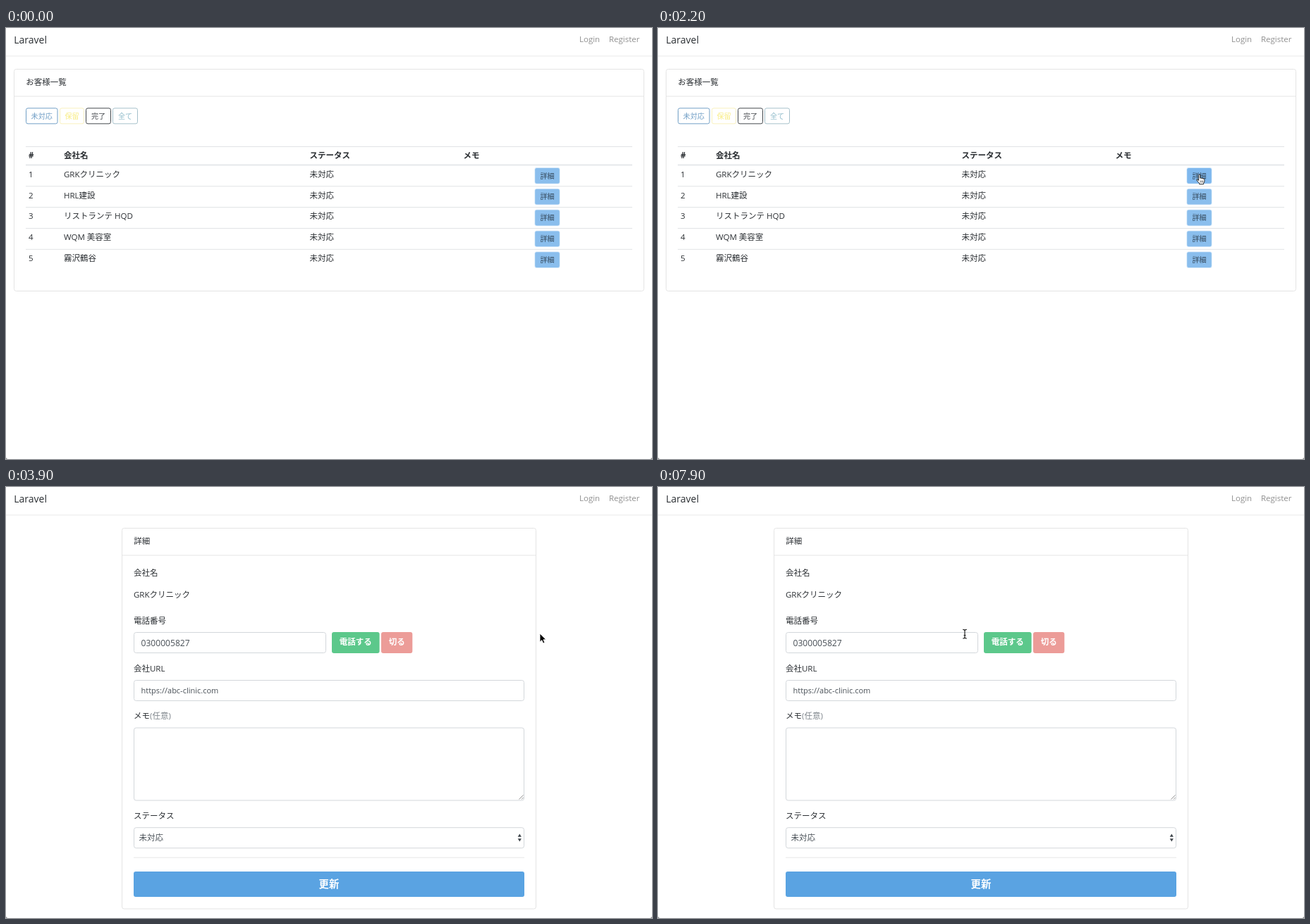
These frames come from a looping animation (916x612 px, 8 s). An HTML page:

```html
<!DOCTYPE html>
<html lang="ja">
<head>
<meta charset="utf-8">
<title>お客様一覧</title>
<style>
html, body { margin: 0; width: 100%; height: 100%; overflow: hidden; background: #fff; }
svg { display: block; }
text { font: 11.5px 'Open Sans', 'Noto Sans CJK JP', 'Noto Sans CJK', sans-serif; white-space: pre; }
</style>
</head>
<body>
<svg id="stage" width="916" height="612" viewBox="0 0 916 612" xmlns="http://www.w3.org/2000/svg">
  <defs>
    <filter id="blur" x="-5%" y="-50%" width="110%" height="200%"><feGaussianBlur stdDeviation="1.6"/></filter>
  </defs>
  <rect width="916" height="612" fill="#fff"/>
  <rect x="-10" y="1.6" width="936" height="38" fill="#000" opacity=".1" filter="url(#blur)"/>
  <rect width="916" height="39" fill="#fff"/>
  <g id="nav"></g>
  <g id="list"></g>
  <g id="detail"></g>
  <path d="M0 609Q0 612 3 612H0ZM916 609Q916 612 913 612H916Z" fill="#777"/>
  <g id="arrow"><path d="M0 0V12.2L2.8 9.6L4.7 14L6.9 13.1L5 8.8H8.8Z" fill="#000" stroke="#fff" stroke-width=".9" stroke-linejoin="round"/></g>
  <g id="hand"><path d="M-.9 8.6V1.2Q-.9 0 .2 0T1.3 1.2V5.2Q2.4 4.3 3.4 5.5Q4.6 4.7 5.4 5.9Q7.4 5.4 7.4 7.4V9.5Q7.2 11.2 6.1 12.3V13.8H.1V12.4Q-2 10.6-3.6 7.9Q-3.9 6.4-2.4 6.8Z" fill="#fff" stroke="#222" stroke-width="1" stroke-linejoin="round"/><path d="M1.6 8.6V11.6M3.4 8.6V11.6M5.1 8.6V11.6" stroke="#333" stroke-width=".7"/></g>
  <g id="beam" fill="none"><path id="bar" d="M-2.8-6.3Q-.2-6.3 0-4.9Q.2-6.3 2.8-6.3M0-5V5M-2.8 6.3Q-.2 6.3 0 4.9Q.2 6.3 2.8 6.3M-1.4 2H1.4" stroke="#222" stroke-width="1.2"/></g>
</svg>
<script>
const $ = id => document.getElementById(id);
const INK = '#2b2f33', FIELD = '#495057', LINE = '#e1e3e5';

const text = (x, y, s, o = {}) =>
  `<text x="${x}" y="${y}" fill="${o.fill || INK}" text-anchor="${o.anchor || 'start'}" ` +
  `style="font-size:${o.size || 11.5}px;font-weight:${o.weight || 400}">${s}</text>`;
const box = (x, y, w, h, fill, stroke = 'none', r = 3, id = '') =>
  `<rect ${id && `id="${id}"`} x="${x}" y="${y}" width="${w}" height="${h}" rx="${r}" fill="${fill}" stroke="${stroke}"/>`;
const rule = (x1, x2, y, w = 1, c = LINE) =>
  `<path d="M${x1} ${y}H${x2}" stroke="${c}" stroke-width="${w}"/>`;
const card = (x, w, h, title) =>
  box(x, 58.5, w, h, '#fff', '#e4e4e4') + rule(x, x + w, 97, 1, '#e4e4e4') + text(x + 16.7, 81.2, title);

$('nav').innerHTML =
  text(11.3, 21.8, 'Laravel', { size: 14 }) +
  text(813, 20.3, 'Login', { fill: '#8f8f8f' }) +
  text(855, 20.3, 'Register', { fill: '#8f8f8f' });

function listPage() {
  const filters = [
    [28.5, 44.5, '未対応', '#719fc6'], [76.5, 34, '保留', '#f8ec80', '#f9f1bd'],
    [113.5, 35, '完了', '#43474c'], [151.5, 35, '全て', '#90bccb', '#a5c0ca']];
  const heads = [[32, '#'], [82, '会社名'], [430.5, 'ステータス'], [648.5, 'メモ']];
  const names = ['GRKクリニック', 'HRL建設', 'リストランテ HQD', 'WQM 美容室', '霧沢鶴谷'];
  let s = card(11.5, 893, 315, 'お客様一覧');
  for (const [x, w, label, ink, edge] of filters)
    s += box(x, 113.9, w, 22, '#fff', edge || ink, 2.5) +
      text(x + w / 2, 128.5, label, { fill: ink, size: 10.1, anchor: 'middle' });
  s += rule(28, 888, 168.5) + rule(28, 888, 194.6, 1.5, '#dfe2e5');
  for (const [x, label] of heads) s += text(x, 185.2, label, { weight: 700 });
  names.forEach((name, i) => {
    const y = 211.7 + i * 29.85;
    if (i) s += rule(28, 888, 194.9 + i * 29.85);
    s += text(32, y, i + 1) + text(82, y, name) + text(430.5, y, '未対応');
    s += box(749.5, y - 13.6, 36, 23.4, '#d3e8fa', 'none', 3, 'ring' + i) +
      box(750.2, y - 12.8, 34.6, 21.8, '#8abeed', 'none', 2.3, 'btn' + i) +
      `<g id="label${i}">${text(767.5, y + 1.8, '詳細', { size: 10.1, anchor: 'middle', fill: '#34485b' })}</g>`;
  });
  return s;
}

function detailPage() {
  const field = (y, w, h) => box(181.5, y, w, h, '#fff', '#d3d7db');
  const white = { fill: '#fff', weight: 700, anchor: 'middle' };
  return card(164.5, 587, 540.5, '詳細') +
    text(181, 126.2, '会社名') + text(181, 157, 'GRKクリニック') +
    text(181, 193.7, '電話番号') + field(206.5, 272, 29) +
    text(191.5, 225.7, '0300005827', { fill: FIELD, size: 12.1 }) +
    box(462, 206, 67.6, 30, '#5cc88b', 'none', 3, 'call') + text(495.7, 224.4, '電話する', white) +
    box(532, 206, 44.3, 30, '#ec9c98') + text(554.2, 224.4, '切る', white) +
    text(181, 261.6, '会社URL') + field(274.5, 553, 29) +
    text(191.5, 292.5, 'https://abc-clinic.com', { fill: FIELD, size: 11 }) +
    text(181, 329.1, 'メモ<tspan fill="#7f868c">(任意)</tspan>') + field(342, 553, 103) +
    '<path d="M727.5 443.5L733.5 437.5M731 443.5L733.5 441" stroke="#777" stroke-width=".8"/>' +
    text(181, 470.8, 'ステータス') + field(483.7, 553, 29) +
    text(188.5, 501.8, '未対応', { fill: FIELD }) +
    '<path d="M725.7 496.8L728.3 492.6L730.9 496.8ZM725.7 499.2L728.3 503.4L730.9 499.2Z" fill="#40464c"/>' +
    rule(181, 735, 526.2, 1, '#e6e6e6') +
    box(181, 546, 554, 36, '#5aa3e2') +
    text(458, 568.7, '更新', { ...white, size: 14.4 });
}

$('list').innerHTML = listPage();
$('detail').innerHTML = detailPage();

// time, hot spot x, y, pointer shape
const path = [
  [0, 0, 0, ''], [600, 770, 409, 'arrow'], [700, 769, 335, 'arrow'], [800, 768, 273, 'arrow'],
  [1000, 776, 270, 'arrow'], [1100, 781, 261, 'arrow'], [1200, 779, 245, 'arrow'],
  [1300, 773, 225, 'arrow'], [1400, 769, 212, 'arrow'], [1500, 767.7, 207.3, 'arrow'],
  [2100, 767.5, 208, 'hand'], [2900, 768, 208.6, 'hand'], [3100, 767.7, 207.5, 'arrow'],
  [3900, 757, 208, 'arrow'], [4000, 715, 213, 'arrow'], [4100, 630, 219, 'arrow'],
  [4200, 525, 221, 'hand'], [4300, 432, 219, 'beam'], [4400, 365, 216, 'beam'],
  [4500, 336, 214.5, 'beam'], [4600, 334, 215.5, 'beam'], [4700, 332.7, 216.3, 'beam'],
  [5300, 332.3, 216.7, 'beam'], [5500, 330, 217.8, 'beam'], [5600, 328, 218.8, 'beam'],
  [5800, 327, 219.3, 'beam'], [7800, 381, 213, 'beam'], [7900, 435, 208.7, 'beam']];

const show = (id, on) => $(id).setAttribute('display', on ? 'inline' : 'none');

function draw(ms) {
  const t = Math.floor(ms / 100) * 100;
  const [, x, y, shape] = path.filter(k => k[0] <= t).pop();
  for (const id of ['arrow', 'hand', 'beam']) show(id, id === shape);
  if (shape) $(shape).setAttribute('transform', `translate(${x} ${y})`);

  show('list', t < 2900);
  show('detail', t >= 2900);
  const hover = t >= 2100, pressed = t >= 2600;
  $('btn0').setAttribute('fill', hover ? '#7fb8ee' : '#8abeed');
  $('ring0').setAttribute('fill', pressed ? '#b4c9dc' : '#d3e8fa');
  $('label0').setAttribute('opacity', pressed ? .3 : 1);
  $('call').setAttribute('fill', t < 3200 ? '#92dbb4' : '#5cc88b');
}

function loop() {
  draw(performance.now() % 8000);
  requestAnimationFrame(loop);
}
loop();
</script>
</body>
</html>
```
